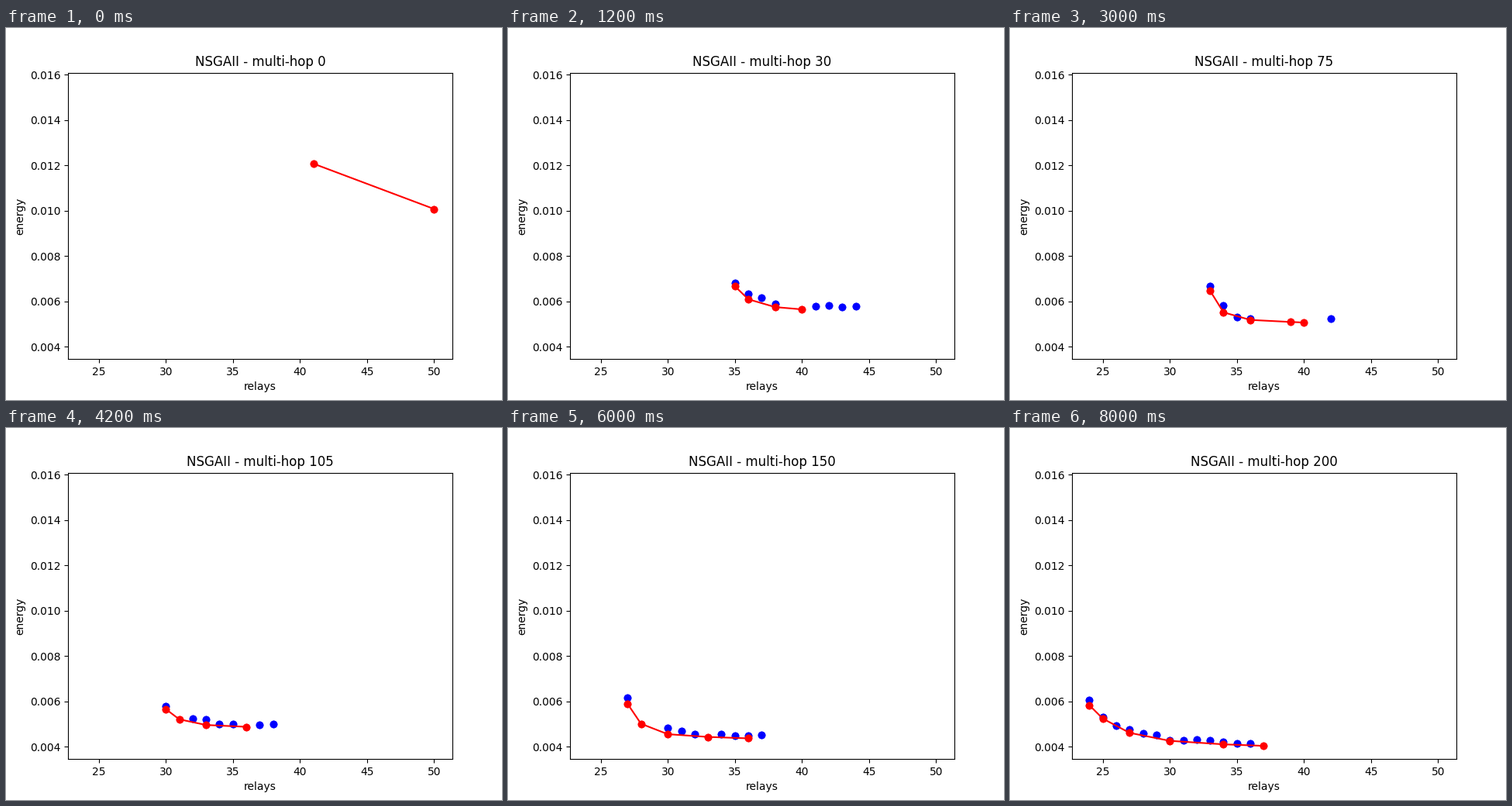
Write a matplotlib script that moves like this. It is 640 px wide and 480 px high and loops after 8200 ms.

```python
import numpy as np
import matplotlib.pyplot as plt
from matplotlib.animation import FuncAnimation

FRAMES, STEP, INTERVAL = 41, 5, 200
LAST = (FRAMES - 1) * STEP
COPIES = 2  # equal solutions recur, which hardens the dot edges

# How the front shrinks; energies in thousandths
GENS = [0, 10, 30, 75, 105, 130, 175, 200]
LEFT = [41, 38, 35, 33, 30, 29, 25, 24]
RIGHT = [50, 45, 40, 40, 36, 38, 35, 37]
TOP = [12.08, 8.6, 6.67, 6.47, 5.66, 5.89, 5.89, 5.83]
LOW = [10.08, 7.2, 5.65, 5.07, 4.88, 4.49, 4.22, 4.04]
DECAY = [0.5, 0.7, 0.95, 1.4, 1.0, 1.5, 0.42, 0.45]


def population(gen):
    left, right, top, low, decay = (
        np.interp(gen, GENS, track) for track in (LEFT, RIGHT, TOP, LOW, DECAY))
    left, right = np.floor(left), np.floor(right)
    width = right - left

    def energy(offset):
        shelf = np.clip(1 - offset / width, 0, 1)
        fall = 0.88 * np.exp(-decay * offset) + 0.12 * shelf
        return low + (top - low) * fall

    # the front spreads out to the right and fills in over time
    n = np.arange(1 + gen // STEP)
    offset = n * (n + 1) // 2
    offset = np.append(offset[offset < width], width)
    front = left + offset, energy(offset)
    front[1][-1] = low

    # dominated solutions lie a little above it
    rng = np.random.default_rng(gen)
    tail = round(5 * (1 - gen / LAST) ** 1.5)
    offset = np.arange(width + tail + 1)
    offset = offset[rng.random(len(offset)) < min(0.75, gen / 20)]
    lift = 0.03 + 0.4 * rng.random(len(offset)) * np.exp(-offset / 8)
    return front, (left + offset, energy(offset) + lift)


def place(dots, x, y):
    dots.set_offsets(np.repeat(np.column_stack([x, y / 1000]), COPIES, axis=0))


fig, ax = plt.subplots(figsize=(6.4, 4.8), dpi=100)
blue = ax.scatter([], [], color="blue")
red = ax.scatter([], [], color="red")
line, = ax.plot([], [], color="red")
ax.set(xlim=(22.704, 51.366), ylim=(0.003456, 0.016096),
       xlabel="relays", ylabel="energy")
title = ax.set_title("")


def update(i):
    gen = i * STEP
    (x, y), others = population(gen)
    line.set_data(x, y / 1000)
    place(red, x, y)
    place(blue, *others)
    title.set_text(f"NSGAII - multi-hop {gen}")
    return blue, red, line, title


anim = FuncAnimation(fig, update, frames=FRAMES, interval=INTERVAL,
                     repeat=True, repeat_delay=0)
plt.show()
```
